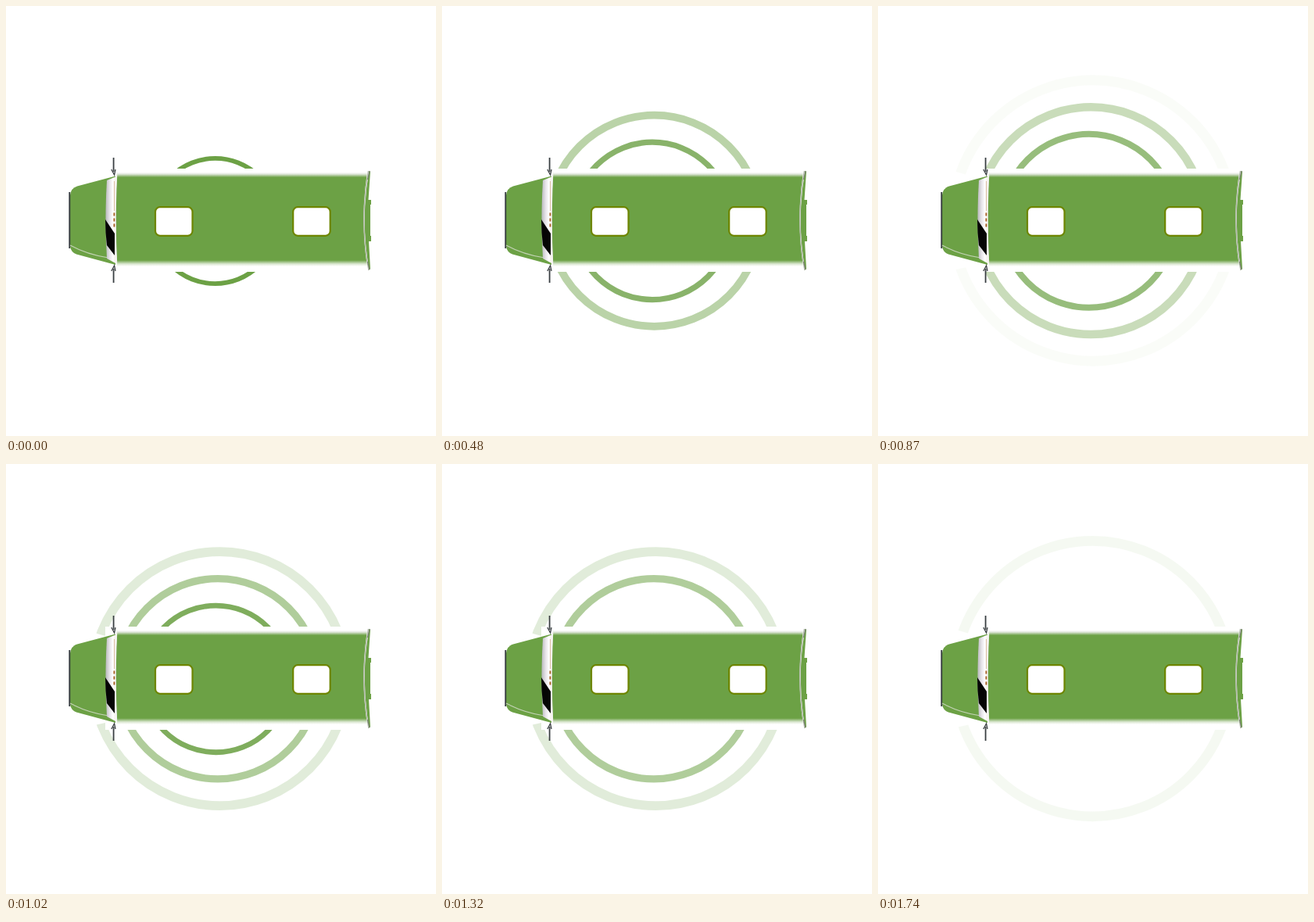
Animation, 550 px wide and 550 px high, one loop 1800 ms. Source, as an HTML page:

```html
<!DOCTYPE html>
<html lang="en">
<head>
<meta charset="utf-8">
<title>Vehicle signal</title>
<style>
  html, body { margin: 0; width: 100%; height: 100%; overflow: hidden; background: #fff; }
  svg { display: block; width: 100vw; height: 100vh; }
</style>
</head>
<body>
<svg viewBox="0 0 550 550">
  <defs>
    <linearGradient id="roof" x2="0" y2="1">
      <stop offset="0" stop-color="#fff"/>
      <stop offset=".02" stop-color="#e4e9e0"/>
      <stop offset=".055" stop-color="#6ca145"/>
      <stop offset=".935" stop-color="#6ca145"/>
      <stop offset=".975" stop-color="#dce8d3"/>
      <stop offset="1" stop-color="#fff"/>
    </linearGradient>
    <linearGradient id="glass">
      <stop offset="0" stop-color="#b9b9bd"/>
      <stop offset=".4" stop-color="#e6e3e8"/>
      <stop offset=".75" stop-color="#fff"/>
      <stop offset="1" stop-color="#f5efe9"/>
    </linearGradient>
    <g id="mirror" fill="none" stroke="#3b4043" stroke-width="1.8">
      <path d="M137.6 194V212"/>
      <path d="M134.8 209L138.6 216L140 209" stroke-width="1.3"/>
    </g>
    <rect id="hatch" x="191" y="257.2" width="47.5" height="36.6" rx="6"
      fill="#fff" stroke="#6d8500" stroke-width="2.2"/>
  </defs>

  <g id="rings" fill="none" stroke="#6ca145"></g>

  <!-- white backing that hides the rings around the vehicle -->
  <path d="M82 212H100L127 220V208H470V340H127V331L100 337H82Z" fill="#fff"/>

  <!-- cab -->
  <path d="M140 217.5L91 230.5Q83 233 82 242V307Q83 315 90 317.5L140 331Z" fill="#6ca145"/>
  <path d="M81.3 238V310" stroke="#30363a" stroke-width="1.8"/>
  <path d="M82 306Q104 318 131 322" fill="none" stroke="#c3d3b5" stroke-width="1.1"/>
  <path d="M129 223L140 218.5V329L129 323Q126 273 129 223Z" fill="url(#glass)"/>
  <path d="M127 273L139 291V319L129 306Q127 290 127 273Z" fill="#050505"/>
  <path d="M138.5 224V262" stroke="#d9b79d" stroke-width=".9"/>
  <path d="M137.5 266.5H141M137.5 273.5H141M137.5 280.5H141" stroke="#a4581c" stroke-width="4"/>
  <use href="#mirror"/>
  <use href="#mirror" transform="matrix(1 0 0 -1 0 548)"/>

  <!-- body -->
  <path d="M142 212.5H462Q453 273 462 333H142Q138.5 273 142 212.5Z" fill="url(#roof)"/>
  <path d="M141.5 215Q138.5 273 141.5 331" fill="none" stroke="#f2f2ef" stroke-width="1.6"/>
  <path d="M464.5 211Q453 273 464.5 338L466 336L464 301H467V294H466V254H467V248H463.5L466 212Z" fill="#6ca145"/>
  <path d="M463.5 211Q452 273 464 338" fill="none" stroke="#b5bcae" stroke-width="1.5"/>
  <path d="M465.3 211L462.5 222M462.5 327L465 337" stroke="#78866c" stroke-width="1.4"/>
  <use href="#hatch"/>
  <use href="#hatch" x="176.2"/>
</svg>
<script>
  const LOOP = 1800, STEP = 30, LIFE = 900;
  const starts = [0, 300, 600, 900];
  const set = (el, attrs) => {
    for (const key in attrs) el.setAttribute(key, attrs[key]);
  };
  const rings = starts.map(() => document.getElementById('rings').appendChild(
    document.createElementNS('http://www.w3.org/2000/svg', 'circle')));

  function draw(time) {
    const t = Math.min(Math.floor(time / STEP) * STEP, LOOP - 2 * STEP);
    rings.forEach((ring, i) => {
      const p = (t - starts[i]) / LIFE;
      const scale = 1 + 1.286 * p;
      set(ring, p < 0 || p >= 1 ? { opacity: 0 } : {
        cx: 267.5 + 7.5 * p,
        cy: 275 - 0.5 * p,
        r: 80.1 * scale,
        'stroke-width': 5.8 * scale,
        opacity: 1 - p
      });
    });
  }

  const begin = performance.now();
  function tick() {
    draw((performance.now() - begin) % LOOP);
    requestAnimationFrame(tick);
  }
  tick();
</script>
</body>
</html>
```
